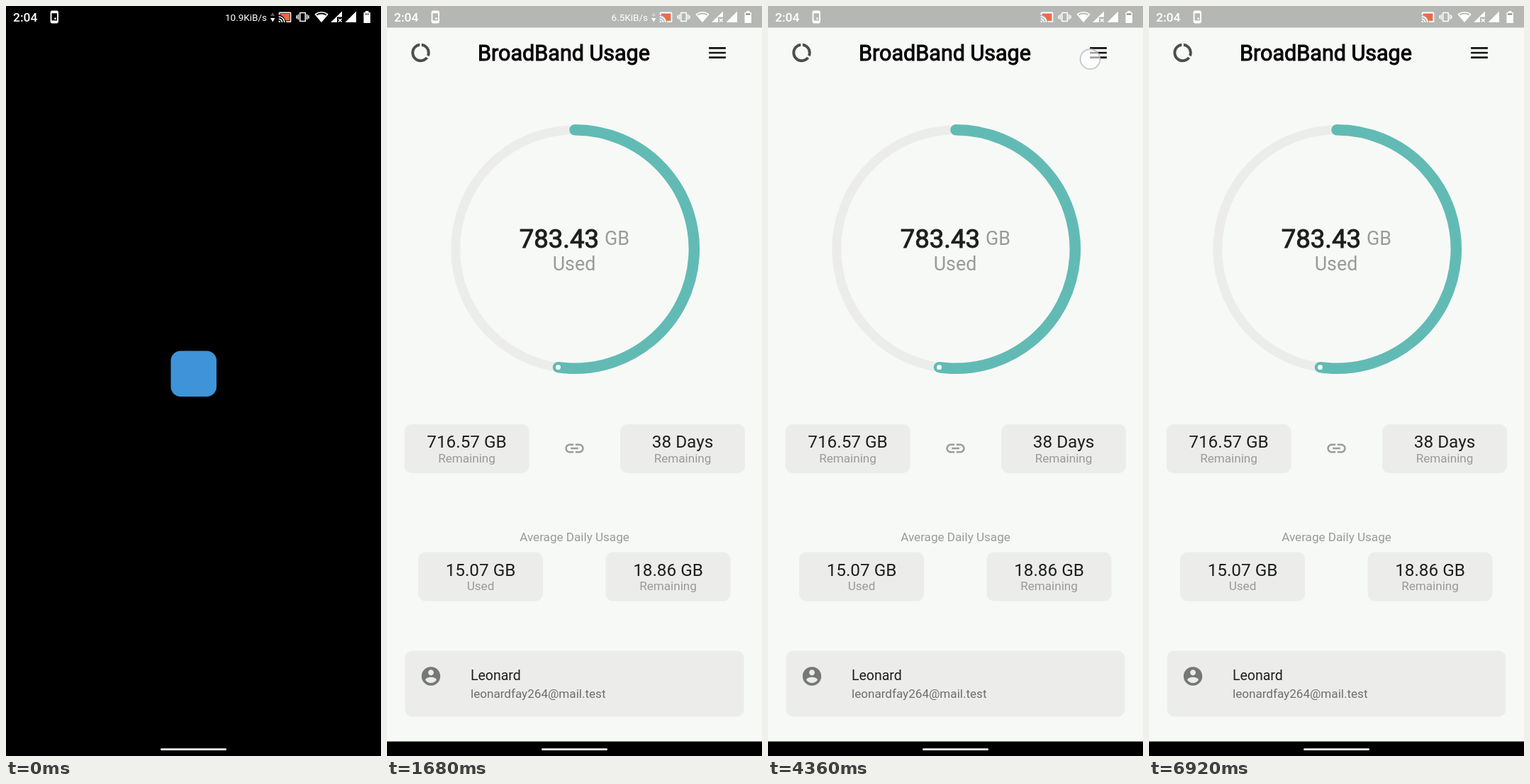
Animation of 529 by 1058 pixels, one loop 6960 ms. Source, as an HTML page:

```html
<!DOCTYPE html>
<html lang="en">
<head>
<meta charset="utf-8">
<title>Broadband usage app</title>
<style>
html, body { margin: 0; width: 100%; height: 100%; overflow: hidden; background: #000; }
svg { display: block; width: 100%; height: 100%; font-family: Roboto, sans-serif; }
</style>
</head>
<body>
<svg id="stage" viewBox="0 0 529 1058" xmlns="http://www.w3.org/2000/svg"></svg>
<script>
const BG = '#f7f9f7', CARD = '#ecedeb', INK = '#1d1f1d', MUTED = '#999b99', SUB = '#757775';

const ICONS = {
  usage: 'M13 2.05v3.03c3.39.49 6 3.39 6 6.92 0 .9-.18 1.75-.48 2.54l2.6 1.53c.56-1.24.88-2.62.88-4.07 0-5.18-3.95-9.45-9-9.95zM12 19c-3.87 0-7-3.13-7-7 0-3.53 2.61-6.43 6-6.92V2.05c-5.06.5-9 4.76-9 9.95 0 5.52 4.47 10 9.99 10 3.31 0 6.24-1.61 8.06-4.09l-2.6-1.53C16.17 17.98 14.21 19 12 19z',
  menu: 'M3 18h18v-2H3v2zm0-5h18v-2H3v2zm0-7v2h18V6H3z',
  link: 'M3.9 12c0-1.71 1.39-3.1 3.1-3.1h4V7H7c-2.76 0-5 2.24-5 5s2.24 5 5 5h4v-1.9H7c-1.71 0-3.1-1.39-3.1-3.1zM8 13h8v-2H8v2zm9-6h-4v1.9h4c1.71 0 3.1 1.39 3.1 3.1s-1.39 3.1-3.1 3.1h-4V17h4c2.76 0 5-2.24 5-5s-2.24-5-5-5z',
  person: 'M12 2C6.48 2 2 6.48 2 12s4.48 10 10 10 10-4.48 10-10S17.52 2 12 2zm0 3c1.66 0 3 1.34 3 3s-1.34 3-3 3-3-1.34-3-3 1.34-3 3-3zm0 14.2c-2.5 0-4.71-1.28-6-3.22.03-1.99 4-3.08 6-3.08 1.99 0 5.97 1.09 6 3.08-1.29 1.94-3.5 3.22-6 3.22z',
  clock: 'M11.99 2C6.47 2 2 6.48 2 12s4.47 10 9.99 10C17.52 22 22 17.52 22 12S17.52 2 11.99 2zM12 20c-4.42 0-8-3.58-8-8s3.58-8 8-8 8 3.58 8 8-3.58 8-8 8zm.5-13H11v6l5.25 3.15.75-1.23-4.5-2.67z',
  ticket: 'M22 10V6c0-1.11-.9-2-2-2H4c-1.1 0-1.99.89-1.99 2v4c1.1 0 1.99.9 1.99 2s-.89 2-2 2v4c0 1.1.9 2 2 2h16c1.1 0 2-.9 2-2v-4c-1.1 0-2-.9-2-2s.9-2 2-2zm-9 7.5h-2v-2h2v2zm0-4.5h-2v-2h2v2zm0-4.5h-2v-2h2v2z',
  router: 'M20.2 5.9l.8-.8C19.6 3.7 17.8 3 16 3s-3.6.7-5 2.1l.8.8C13 4.8 14.5 4.2 16 4.2s3 .6 4.2 1.7zm-.9.8c-.9-.9-2.1-1.4-3.3-1.4s-2.4.5-3.3 1.4l.8.8c.7-.7 1.6-1 2.5-1 .9 0 1.8.3 2.5 1l.8-.8zM19 13h-2V9h-2v4H5c-1.1 0-2 .9-2 2v4c0 1.1.9 2 2 2h14c1.1 0 2-.9 2-2v-4c0-1.1-.9-2-2-2zM8 18H6v-2h2v2zm3.5 0h-2v-2h2v2zm3.5 0h-2v-2h2v2z',
  info: 'M12 2C6.48 2 2 6.48 2 12s4.48 10 10 10 10-4.48 10-10S17.52 2 12 2zm1 15h-2v-6h2v6zm0-8h-2V7h2v2z',
  power: 'M13 3h-2v10h2V3zm4.83 2.17l-1.42 1.42C17.99 7.86 19 9.81 19 12c0 3.87-3.13 7-7 7s-7-3.13-7-7c0-2.19 1.01-4.14 2.58-5.42L6.17 5.17C4.23 6.82 3 9.26 3 12c0 4.97 4.03 9 9 9s9-4.03 9-9c0-2.74-1.23-5.18-3.17-6.83z',
  cast: 'M21 3H3c-1.1 0-2 .9-2 2v3h2V5h18v14h-7v2h7c1.1 0 2-.9 2-2V5c0-1.1-.9-2-2-2zM1 18v3h3c0-1.66-1.34-3-3-3zm0-4v2c2.76 0 5 2.24 5 5h2c0-3.87-3.13-7-7-7zm0-4v2c4.97 0 9 4.03 9 9h2c0-6.08-4.93-11-11-11z',
  castFill: 'M4 6v2.4c4.5 1.3 7.5 4.6 8.8 9.6H20V6z',
  vibrate: 'M0 15h2V9H0v6zm3 2h2V7H3v10zm19-8v6h2V9h-2zm-3 8h2V7h-2v10zM16.5 3h-9C6.67 3 6 3.67 6 4.5v15c0 .83.67 1.5 1.5 1.5h9c.83 0 1.5-.67 1.5-1.5v-15c0-.83-.67-1.5-1.5-1.5zM16 19H8V5h8v14z'
};

const text = (x, y, size, str, fill = INK, anchor = 'start', extra = '') =>
  `<text x="${x}" y="${y}" font-size="${size}" fill="${fill}" text-anchor="${anchor}" ${extra}>${str}</text>`;
const bold = color => `stroke="${color}" stroke-width="1"`;
const icon = (cx, cy, name, fill, s = 1.32) =>
  `<path transform="translate(${cx} ${cy}) scale(${s}) translate(-12 -12)" fill="${fill}" d="${ICONS[name]}"/>`;
const rect = (x, y, w, h, fill, r = 0, extra = '') =>
  `<rect x="${x}" y="${y}" width="${w}" height="${h}" rx="${r}" fill="${fill}" ${extra}/>`;

const card = (x, y, value, label) => rect(x, y, 176, 69, CARD, 10) +
  text(x + 88, y + 33.2, 24.3, value, INK, 'middle') +
  text(x + 88, y + 53.6, 17.1, label, MUTED, 'middle');

const row = (y, name, title, sub) => sub
  ? icon(36, y + 1.5, name, '#838583') + text(93, y + 6.8, 19.5, title) + text(93, y + 32, 17.1, sub, SUB)
  : icon(36, y, name, '#838583') + text(93, y + 6.8, 19.5, title);

const RING = { x: 265, y: 343, r: 168.3 };

const home = `<g id="home">
  ${rect(0, 0, 529, 1058, BG)}
  ${icon(47.5, 66, 'usage', '#4c4e4c')}
  ${text(249.5, 76.6, 30.5, 'BroadBand Usage', '#050505', 'middle', bold('#050505'))}
  ${icon(466, 66, 'menu', '#111')}
  <circle cx="${RING.x}" cy="${RING.y}" r="${RING.r}" fill="none" stroke="${CARD}" stroke-width="13"/>
  <path id="arc" fill="none" stroke="#61bbb4" stroke-width="15.5" stroke-linecap="round"/>
  <circle id="tip" r="3.4" fill="#fff"/>
  ${text(299, 340.8, 36.5, '', INK, 'end', 'id="count" ' + bold(INK))}
  ${text(307, 337, 26.8, 'GB', MUTED)}
  ${text(264, 373, 26.8, 'Used', MUTED, 'middle')}
  ${card(24.5, 590, '716.57 GB', 'Remaining')}
  ${icon(264.5, 624, 'link', '#9b9d9b')}
  ${card(329, 590, '38 Days', 'Remaining')}
  ${text(264.5, 755, 17.1, 'Average Daily Usage', MUTED, 'middle')}
  ${card(44, 770.5, '15.07 GB', 'Used')}
  ${card(308.5, 770.5, '18.86 GB', 'Remaining')}
  ${rect(25.5, 909.5, 478, 93, CARD, 10)}
  ${icon(62, 945.5, 'person', '#767876')}
  ${text(118, 951, 19.5, 'Leonard')}
  ${text(118, 976, 17.1, 'leonardfay264@mail.test', '#6d6f6d')}
</g>`;

const sheet = `<g id="sheet">
  ${rect(0, 595, 529, 500, BG, 14)}
  ${rect(176, 603.5, 177, 3, '#dcdedc', 1.5)}
  ${row(650, 'clock', 'Plan', 'TRQ40K2600B75N')}
  ${row(742.7, 'ticket', 'BX Account Number', 'J280653')}
  ${row(835.5, 'router', 'MAC Address', '3e-a7-2d-81-40-63')}
  ${row(929.2, 'info', 'About')}
  ${row(1001.2, 'power', 'Log Out')}
</g>`;

const status = `${rect(0, 0, 529, 30.5, '#000', 0, 'fill-opacity=".267"')}
  ${text(10, 21.6, 17.4, '2:04', '#fff', 'start', 'font-weight="500"')}
  ${rect(63.5, 7.5, 9.5, 16, 'none', 1.5, 'stroke="#fff" stroke-width="1.9"')}
  <path d="M63 9h10M63 21.7h10" stroke="#fff" stroke-width="2.4"/>
  ${rect(68.3, 16.5, 2.4, 2.4, '#fff')}
  <g id="speed">
    ${text(368, 20.8, 13.5, '', '#fff', 'end', 'id="rate"')}
    <path d="M373 14l3.2-5 3.2 5z" fill="#fff" opacity=".35"/>
    <path d="M373 17h6.4l-3.2 5.5z" fill="#fff"/>
  </g>
  ${icon(393.5, 15.8, 'castFill', '#f0683f', .8)}
  ${icon(393.5, 15.8, 'cast', '#fff', .8)}
  ${icon(418.5, 15.5, 'vibrate', '#fff', .76)}
  <path d="M445 22L436.4 11.7A14 14 0 0 1 453.6 11.7Z" fill="none" stroke="#fff" stroke-width="1.6" stroke-linejoin="round"/>
  <path d="M445 22.5L438 13.7A12 12 0 0 1 452 13.7Z" fill="#fff"/>
  <path d="M458 23L474 7.5V15.5H467V23Z" fill="#fff"/>
  <path d="M469 18l4.6 4.6M473.6 18L469 22.600" stroke="#fff" stroke-width="1.4"/>
  <path d="M478.500 23L494 7.500V23Z" fill="#fff"/>
  <path d="M507 7h4.500v2h2.500v15h-9.500V9h2.500z" fill="#fff"/>
  <path d="M506 12.500V10.500h6.500v2z" fill="#000" opacity=".5"/>`;

document.getElementById('stage').innerHTML = `
  ${rect(0, 0, 529, 1058, '#000')}
  ${rect(232.5, 486.5, 64.5, 64.5, '#3f93d8', 14)}
  ${home}
  ${rect(0, 0, 529, 1058, '#000', 0, 'id="scrim"')}
  ${sheet}
  ${status}
  ${rect(0, 1037.5, 529, 20.5, '#000')}
  ${rect(218, 1047.3, 93, 2.8, '#fff', 1.4)}
  <circle id="touch" r="14" fill="#fff" fill-opacity=".6" stroke="#b4b5c0" stroke-opacity=".75" stroke-width="1.8"/>`;

const el = {};
for (const id of ['home', 'arc', 'tip', 'count', 'scrim', 'sheet', 'speed', 'rate', 'touch'])
  el[id] = document.getElementById(id);

const clamp = v => Math.min(1, Math.max(0, v));

function bezier(x1, y1, x2, y2) {
  const at = (a, b, s) => 3 * a * s * (1 - s) ** 2 + 3 * b * s * s * (1 - s) + s ** 3;
  return x => {
    if (x <= 0 || x >= 1) return clamp(x);
    let lo = 0, hi = 1;
    for (let i = 0; i < 40; i++) {
      const mid = (lo + hi) / 2;
      if (at(x1, x2, mid) < x) lo = mid; else hi = mid;
    }
    return at(y1, y2, lo);
  };
}
const ease = bezier(.25, .1, .25, 1);
const easeIn = bezier(.42, 0, 1, 1);
const easeOut = bezier(0, 0, .58, 1);
const fastOutSlowIn = bezier(.4, 0, .2, 1);
const decelerate = bezier(0, 0, .2, 1);

const LOOP = 6960, STEP = 40;
const HOME_IN = 850.04, SHEET_IN = 4540, SHEET_OUT = 6026;
const TOTAL = 1500, USED = 783.43;
const TAPS = [
  { down: 4160, up: SHEET_IN, x: 454.500, y: 75 },
  { down: 5640, up: SHEET_OUT, x: 453, y: 86 }
];
const TAP_FADE = 260;

function drawRing(value) {
  const a = value / TOTAL * 2 * Math.PI;
  const x = RING.x + RING.r * Math.sin(a), y = RING.y - RING.r * Math.cos(a);
  el.arc.setAttribute('d', `M${RING.x} ${RING.y - RING.r}A${RING.r} ${RING.r} 0 ${a > Math.PI ? 1 : 0} 1 ${x} ${y}`);
  el.tip.setAttribute('cx', x);
  el.tip.setAttribute('cy', y);
  el.count.textContent = value.toFixed(2);
}

function draw(t) {
  const page = clamp((t - HOME_IN) / 300);
  el.home.setAttribute('opacity', easeIn(page));
  el.home.setAttribute('transform', `translate(0 ${(1 - fastOutSlowIn(page)) * 260})`);
  drawRing(USED * easeOut(clamp((t - HOME_IN) / 780)));

  const open = t < SHEET_OUT ? clamp((t - SHEET_IN) / 250) : 1 - clamp((t - SHEET_OUT) / 200);
  el.scrim.setAttribute('opacity', .54 * ease(open));
  el.sheet.setAttribute('transform', `translate(0 ${(1 - decelerate(open)) * 443})`);

  el.rate.textContent = t < 1120 ? '10.9KiB/s' : '6.5KiB/s';
  el.speed.setAttribute('visibility', t < 2160 ? 'visible' : 'hidden');

  const tap = TAPS.find(p => t >= p.down && t < p.up + TAP_FADE);
  el.touch.setAttribute('opacity', tap ? 1 - clamp((t - tap.up) / TAP_FADE) : 0);
  if (tap) {
    el.touch.setAttribute('cx', tap.x);
    el.touch.setAttribute('cy', tap.y);
  }
}

const start = performance.now();
function tick() {
  const t = (performance.now() - start) % LOOP;
  draw(Math.floor(t / STEP) * STEP);
  requestAnimationFrame(tick);
}
tick();
</script>
</body>
</html>
```
